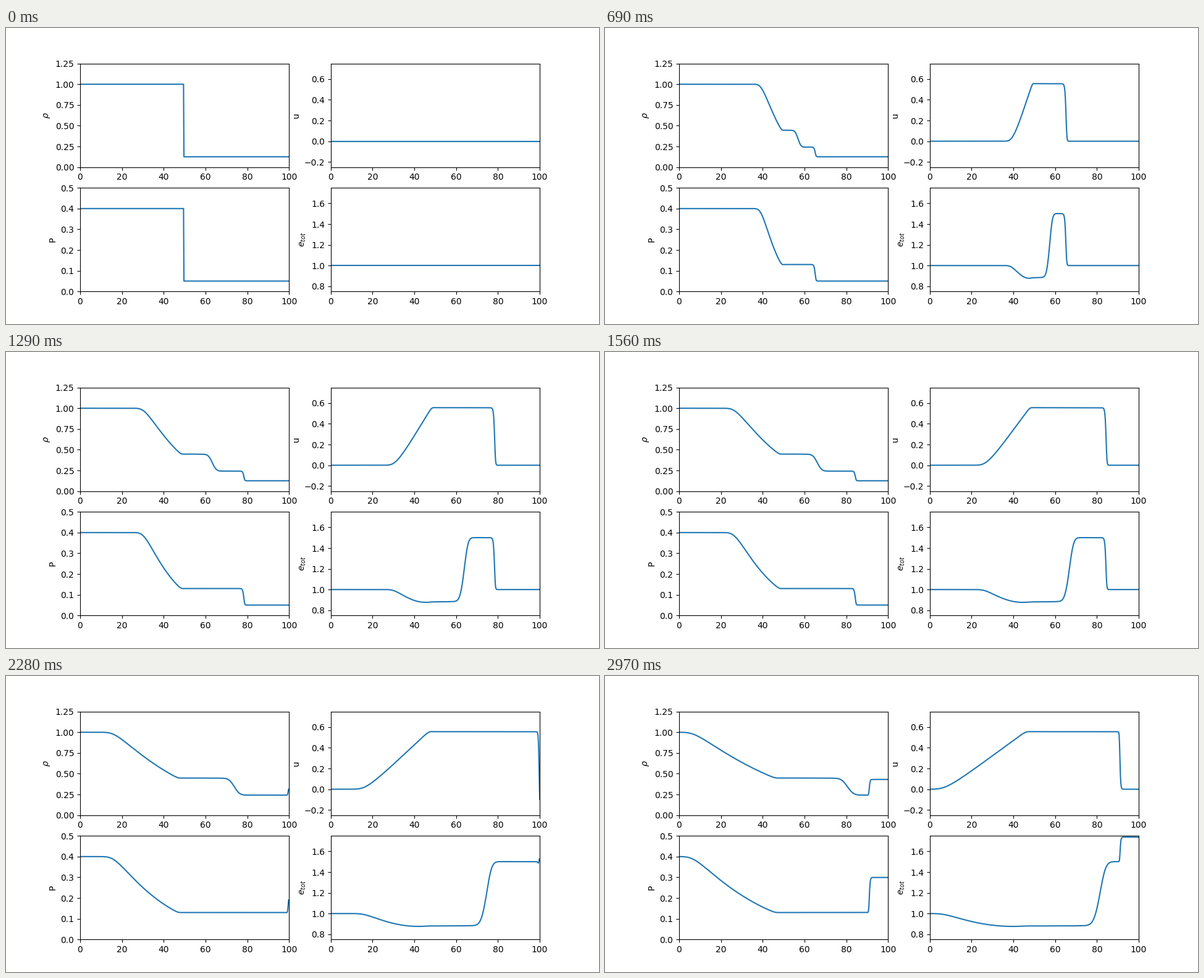
Write a matplotlib script that moves like this. It is 960 by 480 pixels and loops after 3 s.

```python
import numpy as np
import matplotlib.pyplot as plt
from matplotlib.animation import FuncAnimation

GAMMA = 1.4
CELLS = 502           # one mirror cell at each end
FRAMES = 100
STEPS = 10            # solver steps per frame
CFL = 0.41

x = np.linspace(0, 100, CELLS)
dx = x[1] - x[0]


def primitives(U):
    rho = U[0]
    u = U[1] / rho
    p = (GAMMA - 1) * (U[2] - 0.5 * rho * u**2)
    return rho, u, p


def roe_flux(U):
    """First-order Roe flux at every cell face."""
    rho, u, p = primitives(U)
    F = np.array([U[1], U[1] * u + p, (U[2] + p) * u])
    H = (U[2] + p) / rho
    w = np.sqrt(rho)

    def mean(q):
        return (w[:-1] * q[:-1] + w[1:] * q[1:]) / (w[:-1] + w[1:])

    ua, Ha, ra = mean(u), mean(H), w[:-1] * w[1:]
    c2 = (GAMMA - 1) * (Ha - 0.5 * ua**2)
    c = np.sqrt(c2)
    drho, du, dp = np.diff(rho), np.diff(u), np.diff(p)
    one = np.ones_like(ua)
    waves = (
        (ua - c, (dp - ra * c * du) / (2 * c2), (one, ua - c, Ha - ua * c)),
        (ua, drho - dp / c2, (one, ua, 0.5 * ua**2)),
        (ua + c, (dp + ra * c * du) / (2 * c2), (one, ua + c, Ha + ua * c)),
    )
    jump = sum(np.abs(s) * a * np.array(k) for s, a, k in waves)
    return 0.5 * (F[:, :-1] + F[:, 1:] - jump)


def mirror_ends(U):
    U[:, 0], U[:, -1] = U[:, 1], U[:, -2]
    U[1, 0] *= -1
    U[1, -1] *= -1


def advance(U):
    rho, u, p = primitives(U)
    c = np.sqrt(GAMMA * p / rho)
    dt = CFL * dx / (np.abs(u).max() + c.max())
    U[:, 1:-1] -= dt / dx * np.diff(roe_flux(U), axis=1)
    mirror_ends(U)


def simulate():
    rho = np.where(x < 49.6, 1.0, 0.125)
    U = np.array([rho, np.zeros(CELLS), rho])
    states = []
    for _ in range(FRAMES):
        r, u, p = primitives(U)
        states.append((r.copy(), u, p, U[2] / r))
        for _ in range(STEPS):
            advance(U)
    return states


states = simulate()

fig, axes = plt.subplots(2, 2, figsize=(9.6, 4.8), dpi=100)
panels = (
    (r"$\rho$", 0, 1.25),
    ("u", -0.25, 0.75),
    ("P", 0, 0.5),
    (r"$e_{tot}$", 0.75, 1.75),
)
lines = []
for ax, (label, low, high) in zip(axes.flat, panels):
    ax.set_xlim(0, 100)
    ax.set_ylim(low, high)
    ax.set_ylabel(label)
    lines += ax.plot(x, np.zeros(CELLS))


def update(i):
    for line, values in zip(lines, states[i]):
        line.set_ydata(values)
    return lines


anim = FuncAnimation(fig, update, frames=FRAMES, interval=30, repeat=True)
plt.show()
```
